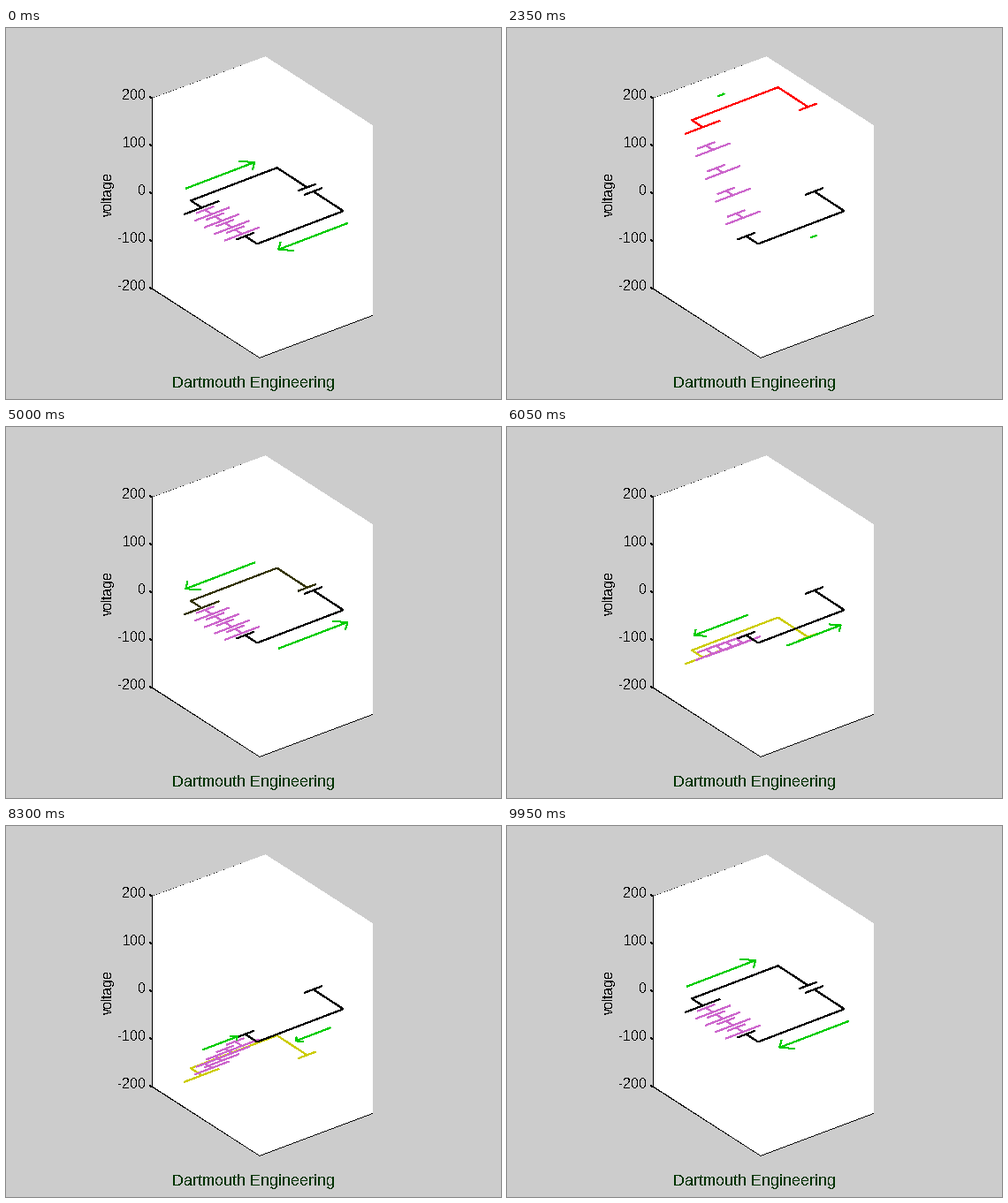
Recreate the animation shown at these times as a matplotlib script. Size 560 by 420 pixels, loop 10 s.

```python
import numpy as np
import matplotlib.pyplot as plt
from matplotlib.animation import FuncAnimation

W, H, DPI = 560, 420, 100
FRAMES, INTERVAL = 200, 50
PX = 72 / DPI                       # points per pixel
SWING = 91.4                        # peak voltage as pixels of height

# Crisp text with hinted, unsmoothed glyphs
plt.rcParams.update({
    "font.family": "Liberation Sans",
    "text.antialiased": False,
    "text.hinting": "native",
    "text.hinting_factor": 1,
})

fig = plt.figure(figsize=(W / DPI, H / DPI), dpi=DPI, facecolor="#cccccc")
ax = fig.add_axes([0, 0, 1, 1])
ax.set_xlim(-0.5, W - 0.5)
ax.set_ylim(H - 0.5, -0.5)
ax.axis("off")

# Screen directions of the circuit's two floor axes, and its left corner
ALONG = np.array([97.5, -37.2])
ACROSS = np.array([75.0, 49.0])
CORNER = np.array([208.6, 194.9])


def at(u, v):
    return CORNER + u * ALONG + v * ACROSS


def chain(*parts):
    """Join polylines into one array, separated by gaps."""
    gap = np.full((1, 2), np.nan)
    return np.vstack([row for part in parts for row in (np.array(part), gap)])


def plate(u, v, half):
    return [at(u - half, v), at(u + half, v)]


def stroke(color, width=1, z=2):
    # Unsmoothed lines fill every pixel they touch, so a width of 1 covers 2
    line, = ax.plot([], [], color=color, lw=width * PX, antialiased=False,
                    solid_capstyle="butt", solid_joinstyle="miter",
                    snap=False, zorder=z)
    return line


def place(line, pts, lift=0.0):
    line.set_data(pts[:, 0], pts[:, 1] - lift)


def box(color, inset):
    """The axes box, with its left and lower edges moved inwards."""
    left, right = 164.9 + inset, 414.4
    pts = [(left, 79.4), (293, 32.4), (right, 110.4), (right, 324.7 - inset),
           (286.6, 372.7 - inset), (left, 294.7 - inset)]
    ax.add_patch(plt.Polygon(pts, fc=color, ec="none", antialiased=False,
                             snap=False, zorder=0))


# A white box over a black one leaves the dark left and lower edges
box("black", 0)
box("white", 1)

ticks = [[(162, 77.5 + 54 * k), (165, 79 + 54 * k)] for k in range(5)]
place(stroke("black", 0.5, 1), chain(*ticks))

for k in range(5):
    ax.text(158, 81 + 54 * k, str(200 - 100 * k), fontsize=16 * PX,
            ha="right", va="baseline")
ax.text(115, 188, "voltage", fontsize=16 * PX, rotation=90,
        ha="center", va="center")
ax.text(279.5, 407, "Dartmouth Engineering", fontsize=18 * PX,
        color="#003300", ha="center", va="baseline")

# Circuit: a stack of five cells on the left, one capacitor on the right
FIRST, GAP, PITCH = 0.163, 0.05, 0.152
LAST = FIRST + 4 * PITCH + GAP

high_side = chain([at(0, FIRST), at(0, 0), at(1, 0), at(1, 0.453)],
                  plate(0, FIRST, 0.2), plate(1, 0.453, 0.1))
low_side = chain([at(0, LAST), at(0, 1), at(1, 1), at(1, 0.547)],
                 plate(0, LAST, 0.1), plate(1, 0.547, 0.1))


def link(k):
    top = FIRST + k * PITCH + GAP
    end = FIRST + (k + 1) * PITCH
    return chain(plate(0, top, 0.1), [at(0, top), at(0, end)], plate(0, end, 0.2))


links = [link(k) for k in range(4)]

hot = stroke("black", z=2)
link_lines = [stroke("#cc66cc", z=3) for _ in links]
place(stroke("black", z=4), low_side)
arrows = [stroke("#00cc00", z=5) for _ in range(2)]


def arrow(center, size):
    tip = 0.4 * ALONG
    barbs = [tip - 0.1 * ALONG - 0.1 * ACROSS, tip,
             tip - 0.1 * ALONG + 0.1 * ACROSS]
    return np.array(center) + size * chain([-tip, tip], barbs)


def hot_color(s):
    """Black at zero, red when positive, dark yellow when negative."""
    level = round(5 * np.sqrt(abs(s))) / 5
    if s >= 0:
        return (level, 0, 0)
    level = min(level, 0.8)
    return (level, level, 0)


def update(i):
    phase = 2 * np.pi * i / (FRAMES - 1)
    volts, amps = np.sin(phase), np.cos(phase)
    lift = SWING * volts
    place(hot, high_side, lift)
    hot.set_color(hot_color(volts))
    for k, line in enumerate(link_lines):
        place(line, links[k], lift * (4 - k) / 5)
    place(arrows[0], arrow((241.7, 166.4), amps), lift)
    place(arrows[1], arrow((346.8, 235.4), -amps))
    return [hot, *link_lines, *arrows]


anim = FuncAnimation(fig, update, frames=FRAMES, interval=INTERVAL,
                     repeat=True, repeat_delay=0, blit=False)
plt.show()
```
